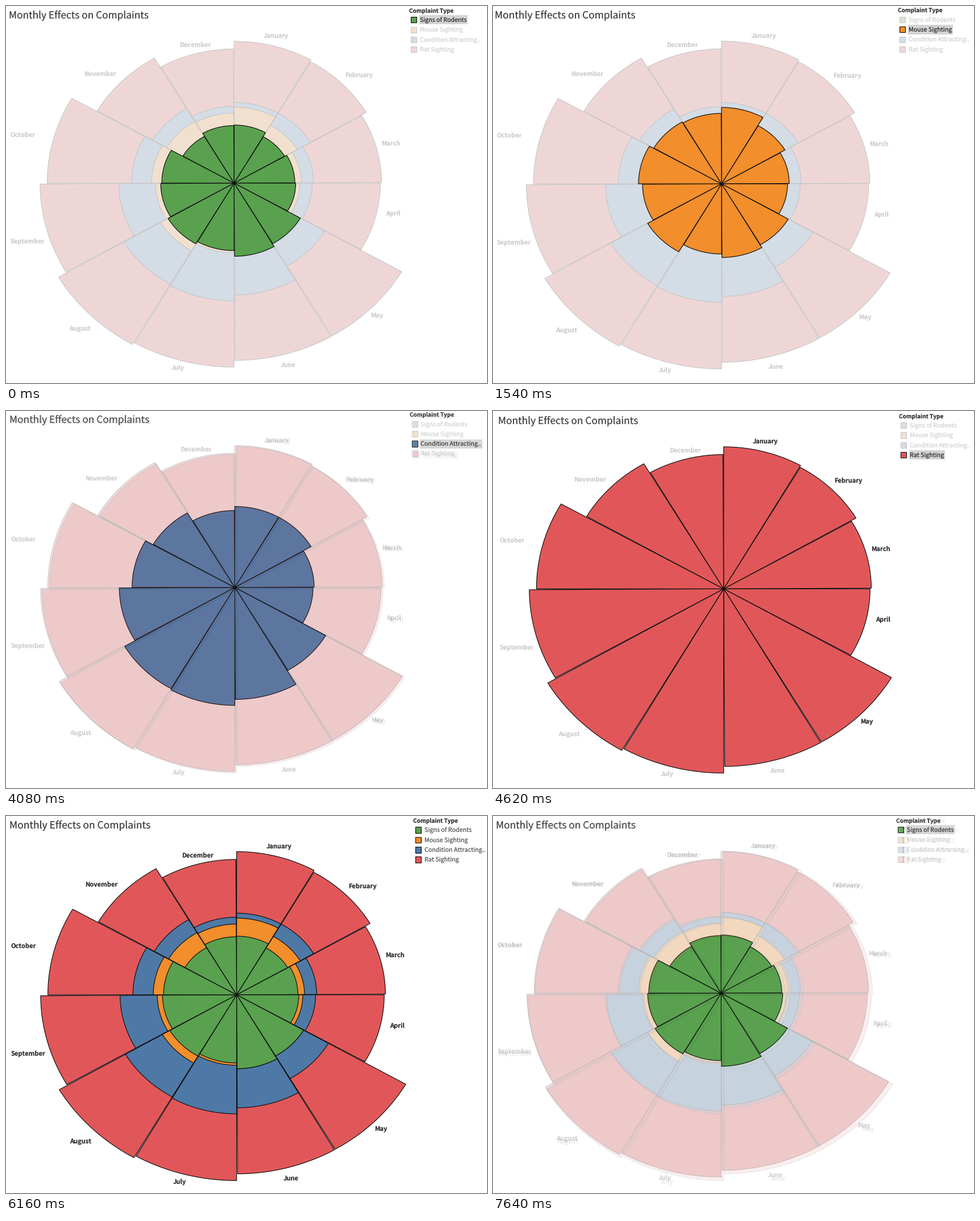
Animation of 846x662 px, one loop 7.7 s. Source, as a matplotlib script:

```python
import numpy as np
import matplotlib.pyplot as plt
from matplotlib.animation import FuncAnimation
from matplotlib.patches import Polygon, Rectangle
from matplotlib.transforms import Affine2D

W, H, DPI = 846, 662, 64
PT = 72 / DPI                     # points per pixel
TICK, HOLD, STEP, STEPS = 20, 1000, 60, 10
SCENE = HOLD + STEP * (STEPS - 1)

plt.rcParams["font.family"] = "Noto Sans CJK JP"
plt.rcParams["text.hinting"] = "none"

CENTER = (401.2, 311)
STRETCH = 1.094                   # horizontal stretch of the rose

KINDS = ["Signs of Rodents", "Mouse Sighting", "Condition Attracting..", "Rat Sighting"]
COLORS = [(89, 161, 79), (242, 142, 43), (78, 121, 167), (225, 87, 89)]
ROWS = [24.3, 41.8, 59, 76]

# month, label centre, cumulative radii per complaint kind
MONTHS = [
    ("January", 475, 52, (102, 133.4, 142, 249)),
    ("February", 620.5, 121, (94, 117.2, 142, 246)),
    ("March", 677, 241, (97.6, 108.1, 127.5, 237)),
    ("April", 681, 364, (99, 105.4, 125.7, 235)),
    ("May", 652, 543, (123, 123, 168.7, 311)),
    ("June", 496, 629.5, (128.5, 128.5, 196.5, 311.3)),
    ("July", 302, 635, (118.5, 122.4, 207, 323)),
    ("August", 130, 566, (123, 136.8, 205, 327)),
    ("September", 38, 413, (118, 126.3, 185.5, 312)),
    ("October", 30, 226, (116.3, 132.7, 165, 300.5)),
    ("November", 166, 119, (95, 125, 151.3, 254)),
    ("December", 333, 68, (101, 123, 135, 235.5)),
]

# highlighted kind (None = all), centre x, centre y, scale, count of dark labels
SCENES = [
    (0, 401.2, 311, 1, 0),
    (1, 402, 312.3, 1.0061, 0),
    (2, 402.4, 309.8, 1.0005, 0),
    (3, 405.7, 312.3, 1.0015, 5),
    (None, 405.6, 314, 1.0098, 12),
]


def gray(v):
    return (v / 255,) * 3


def tint(kind, dim):
    c = np.array(COLORS[kind])
    return tuple((0.18 * c + 0.82 * 242 if dim else c) / 255)


def wedge(month, radius):
    a = np.radians(30 * month + np.linspace(0, 29.7, 60))
    x = CENTER[0] + STRETCH * radius * np.sin(a)
    y = CENTER[1] - radius * np.cos(a)
    return np.vstack([CENTER, np.column_stack([x, y])])


def draw_scene(ax, pick, cx, cy, scale, dark):
    tr = (Affine2D().translate(-CENTER[0], -CENTER[1]).scale(scale)
          .translate(cx, cy) + ax.transData)

    def text(x, y, s, size, color, **kw):
        return ax.text(x, y, s, size=size * scale * PT, color=gray(color),
                       transform=tr, **kw)

    def is_dim(kind):
        return pick not in (None, kind)

    order = [3, 2, 1, 0]
    if pick is not None:
        order.remove(pick)
        order.append(pick)
    for z, kind in enumerate(order):
        dim = is_dim(kind)
        for m, month in enumerate(MONTHS):
            ax.add_patch(Polygon(wedge(m, month[3][kind]), fc=tint(kind, dim),
                                 ec=gray(200 if dim else 15), lw=1.2 * PT,
                                 joinstyle="round", transform=tr, zorder=z))

    for m, (name, x, y, _) in enumerate(MONTHS):
        text(x, y + 4, name, 11, 50 if m < dark else 206, ha="center",
             weight="semibold")

    text(5, 22.2, "Monthly Effects on Complaints", 17.3, 60)
    text(709, 11.5, "Complaint Type", 10, 50, weight="semibold")
    for kind, (label, y) in enumerate(zip(KINDS, ROWS)):
        dim = is_dim(kind)
        ax.add_patch(Rectangle((712.2, y - 5.2), 10.2, 10.2, fc=tint(kind, dim),
                               ec=gray(200 if dim else 15), lw=1.1 * PT, transform=tr))
        shade = 208 if dim else 85 if pick is None else 45
        t = text(728, y + 4, label, 10.6, shade, zorder=6)
        if kind == pick:
            width = t.get_window_extent().width / scale
            ax.add_patch(Rectangle((727, y - 8), width + 3, 16, fc=gray(212),
                                   lw=0, transform=tr, zorder=5))


fig = plt.figure(figsize=(W / DPI, H / DPI), dpi=DPI, facecolor="white")


def render(scene):
    ax = fig.add_axes([0, 0, 1, 1])
    ax.set(xlim=(0, W), ylim=(H, 0))
    ax.axis("off")
    draw_scene(ax, *scene)
    fig.canvas.draw()
    shot = np.array(fig.canvas.buffer_rgba())[..., :3].astype(float)
    ax.remove()
    return shot


shots = [render(s) for s in SCENES]
view = fig.figimage(shots[0].astype(np.uint8), 0, 0, origin="upper")


def update(frame):
    i, t = divmod(frame * TICK, SCENE)
    k = ((t - HOLD) // STEP + 1) / STEPS if t >= HOLD else 0
    mix = shots[i] * (1 - k) + shots[(i + 1) % len(shots)] * k
    view.set_data(np.rint(mix).astype(np.uint8))
    return [view]


anim = FuncAnimation(fig, update, frames=len(SCENES) * SCENE // TICK,
                     interval=TICK, repeat=True, repeat_delay=0)
plt.show()
```
